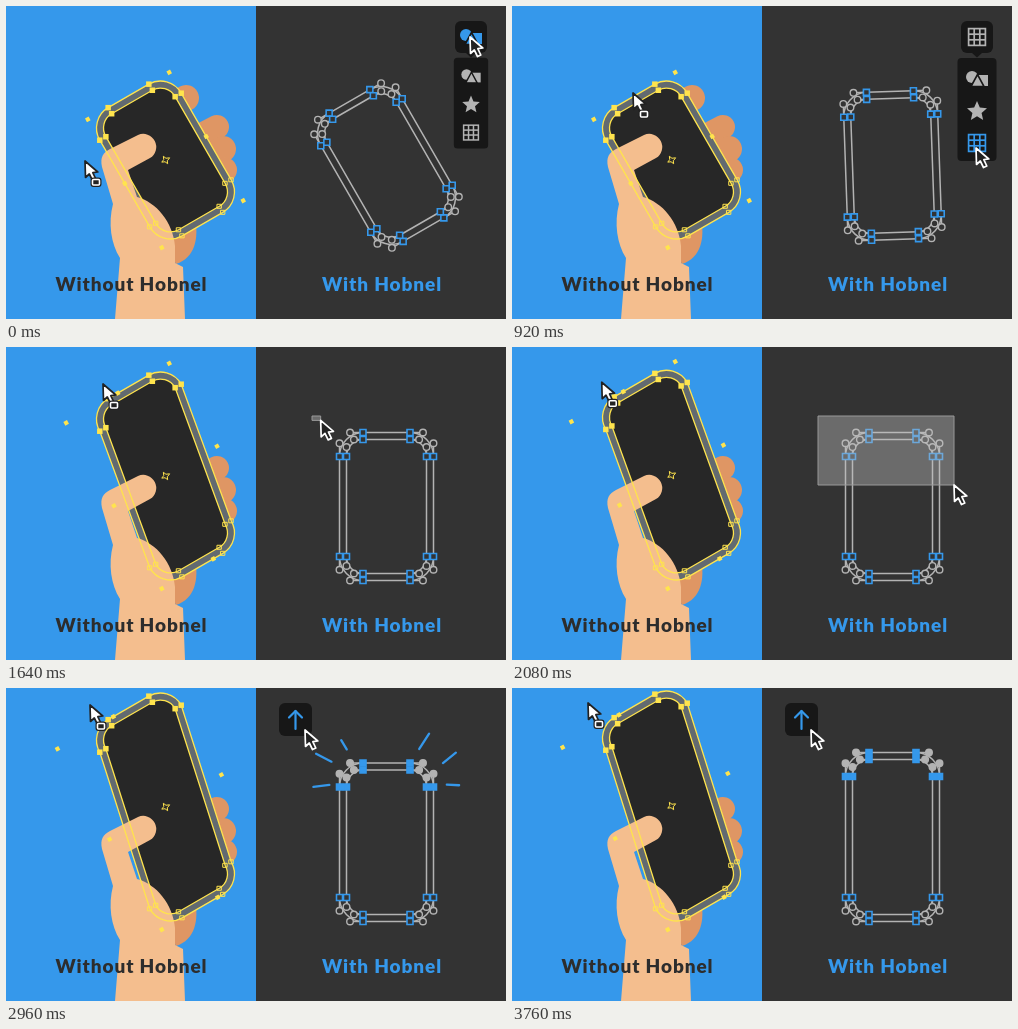
An HTML page with a canvas that plays this animation: 500x313 px, repeating every 3.8 s.

```html
<!DOCTYPE html>
<html lang="en">
<head>
<meta charset="utf-8">
<title>Without and with Hobnel</title>
<style>
  html, body { margin: 0; width: 100%; height: 100%; overflow: hidden; background: #333; }
  canvas { display: block; }
</style>
</head>
<body>
<canvas id="stage" width="500" height="313"></canvas>
<script>
const ctx = document.getElementById('stage').getContext('2d');
const LOOP = 3800, STEP = 40;
const BLUE = '#3598eb', DARK = '#333', BLACK = '#171717', GREY = '#b3b3b3';
const YELLOW = '#ffe44d', SKIN = '#f4be8e', SHADE = '#df9664';

// Pointer tracks: time, x, y
const leftTrack = [
  [0, 79, 155], [120, 80, 153], [840, 121, 87], [920, 121, 87], [1000, 111, 46], [1100, 92, 68],
  [1180, 108, 36], [1300, 75, 62], [1460, 100, 34], [1640, 97, 37], [1840, 45, 45],
  [2040, 98, 34], [2200, 45, 42], [2480, 70, 27], [2640, 43, 42], [2760, 80, 20],
  [2860, 45, 45], [2960, 84, 17], [3160, 13, 46], [3300, 80, 25], [3360, 50, 40],
  [3440, 71, 25], [3580, 36, 46], [3760, 76, 15]
];
const rightTrack = [
  [0, 464, 31], [80, 464, 31], [320, 470, 85], [560, 464, 142], [940, 464, 142],
  [1480, 306, 69], [1560, 306, 69], [2080, 442, 138], [2240, 442, 138],
  [2480, 338, 121], [2760, 299, 42]
];
const grab = [121, 87], marqueeStart = [306, 69];
const clicks = [2840, 3140];
const sparks = [
  [327, 107, 301, 110], [329, 86, 304, 73], [342, 74, 333, 59],
  [411, 75, 427, 50], [434, 88, 455, 71], [438, 107, 458, 108]
];

const ramp = (t, a, b) => Math.min(1, Math.max(0, (t - a) / (b - a)));
const smooth = p => p * p * (3 - 2 * p);

// Monotone Hermite interpolation through the keys
function follow(keys, t) {
  const i = keys.findIndex(k => k[0] > t);
  if (i < 0) return keys[keys.length - 1].slice(1);
  const a = keys[i - 1], b = keys[i], span = b[0] - a[0], p = (t - a[0]) / span;
  const slope = (j, c) => {
    const u = keys[j - 1], v = keys[j], w = keys[j + 1];
    if (!u || !w || (v[c] - u[c]) * (w[c] - v[c]) <= 0) return 0;
    return (w[c] - u[c]) / (w[0] - u[0]);
  };
  return [1, 2].map(c =>
    a[c] + (b[c] - a[c]) * smooth(p) +
    span * p * (1 - p) * (slope(i - 1, c) * (1 - p) - slope(i, c) * p));
}

function paint(path, fill, stroke, width = 1.4) {
  if (fill) { ctx.fillStyle = fill; ctx.fill(path); }
  if (stroke) { ctx.strokeStyle = stroke; ctx.lineWidth = width; ctx.stroke(path); }
}

function box(x, y, w, h, r = 0) {
  const path = new Path2D();
  path.roundRect(x, y, w, h, r);
  return path;
}
const square = (x, y, size) => box(x - size / 2, y - size / 2, size, size);

function disc(x, y, r) {
  const path = new Path2D();
  path.arc(x, y, r, 0, 7);
  return path;
}

function poly(points, closed = true) {
  const path = new Path2D();
  points.forEach(p => path.lineTo(...p));
  if (closed) path.closePath();
  return path;
}

// Rounded frame: maps local points to the stage, top half moved by `shift`
function makePhone(cx, cy, degrees, shift) {
  const cos = Math.cos(degrees * Math.PI / 180), sin = Math.sin(degrees * Math.PI / 180);
  const place = (x, y) => [cx + x * cos - y * sin, cy + x * sin + y * cos];
  const move = (x, y) => {
    const p = place(x, y);
    return y < 0 ? [p[0] + shift[0], p[1] + shift[1]] : p;
  };
  const rings = [[47, 74], [40, 67]].map(([w, h]) => {
    const corner = (sx, sy) => [
      move(sx * 23.5, sy * h),
      move(sx * (23.5 + .552 * (w - 23.5)), sy * h),
      move(sx * w, sy * (50 + .552 * (h - 50))),
      move(sx * w, sy * 50)
    ];
    const corners = [corner(-1, -1).reverse(), corner(1, -1), corner(1, 1).reverse(), corner(-1, 1)];
    const path = new Path2D();
    corners.forEach(([a, b, c, d]) => {
      path.lineTo(...a);
      path.bezierCurveTo(...b, ...c, ...d);
    });
    path.closePath();
    return { path, corners };
  });
  return { rings, place, cos, sin };
}

function drawPointer(x, y, fill, edge, badge) {
  ctx.save();
  ctx.translate(x, y);
  ctx.lineJoin = 'round';
  const arrow = poly([[0, 0], [.5, 16.5], [4.3, 13], [7.5, 19.5], [10.8, 18], [7.8, 11.7], [12.8, 11]]);
  paint(arrow, fill, edge, 1.7);
  if (badge) {
    const tag = box(7.5, 18.5, 7, 5.5, 1);
    paint(tag, null, edge, 4);
    paint(tag, edge, fill, 1.6);
  }
  ctx.restore();
}

function drawLabel(text, x, color) {
  ctx.font = '900 19px Lato, sans-serif';
  ctx.letterSpacing = '.9px';
  ctx.textAlign = 'center';
  ctx.fillStyle = color;
  ctx.fillText(text, x, 285);
}

function drawFingers() {
  ctx.lineCap = 'round';
  [[180, 92, 26], [211, 121, 24], [217, 143, 26], [218.5, 164, 25]].forEach(([x, y, width]) =>
    paint(poly([[x - 25, y + 13], [x, y]], false), null, SHADE, width));
  paint(new Path2D('M150 222L189 212C193 232 189 252 170 258Z'), SHADE);
}

function drawHand() {
  paint(new Path2D(`M109 313L114 252C105 238 102 217 107 198L96 161
    C94 151 97 147 104 143L132 129A13 13 0 0 1 144 152L122 164L131 191
    C150 196 167 216 169 240L169 257L177 261L179 313Z`), SKIN);
}

function drawLeft(t) {
  ctx.save();
  ctx.beginPath();
  ctx.rect(0, 0, 250, 313);
  ctx.clip();
  ctx.fillStyle = BLUE;
  ctx.fillRect(0, 0, 250, 313);

  const pointer = follow(leftTrack, t);
  // The drag snaps to whichever axis dominates
  let shift = [0, 0];
  if (t > 920) {
    const dx = pointer[0] - grab[0], dy = pointer[1] - grab[1];
    shift = Math.abs(dy) > Math.abs(dx) ? [0, dy] : [dx, 0];
  }
  const { rings, place, cos, sin } = makePhone(159.5, 154, -30, shift);

  drawFingers();
  paint(rings[0].path, '#626a70');
  paint(rings[1].path, '#272727');
  drawHand();
  rings.forEach(({ path, corners }) => {
    paint(path, null, YELLOW, 1.3);
    corners.forEach((c, i) => [c[0], c[3]].forEach(p =>
      i < 2 ? paint(square(...p, 5.5), YELLOW) : paint(square(...p, 4), null, YELLOW, 1)));
  });

  // Transform box around all anchors, in the tilted axes
  const lx = shift[0] * cos + shift[1] * sin, ly = shift[1] * cos - shift[0] * sin;
  const x0 = Math.min(-47, -47 + lx), x1 = Math.max(47, 47 + lx), y0 = -74 + ly, y1 = 74;
  const mx = (x0 + x1) / 2, my = (y0 + y1) / 2;
  for (const x of [x0, mx, x1]) for (const y of [y0, my, y1]) {
    if ((x === mx) && (y === my)) continue;
    if ((x === mx) && !shift[0] && !shift[1]) continue;
    const [px, py] = place(x, y);
    paint(poly([[px - 2.8, py - .8], [px + .8, py - 2.8], [px + 2.8, py + .8], [px - .8, py + 2.8]]), YELLOW);
  }
  const [sx, sy] = place(mx, my);
  const star = Array.from({ length: 8 }, (_, i) => {
    const a = (i * 45 + 15) * Math.PI / 180, r = i % 2 ? 4.3 : 1.8;
    return [sx + r * Math.cos(a), sy + r * Math.sin(a)];
  });
  paint(poly(star), null, YELLOW, 1);

  drawLabel('Without Hobnel', 125.5, '#2d2d2d');
  drawPointer(...pointer, '#fff', '#222', true);
  ctx.restore();
}

const icons = {
  shapes(x, y, color) {
    paint(box(x + 1, y - 4, 10, 11), color);
    paint(disc(x - 5, y - 2, 6), color);
    paint(poly([[x - 6, y + 7.5], [x + .5, y - 4.5], [x + 7, y + 7.5]]), color, BLACK, 1.6);
  },
  star(x, y, color) {
    paint(poly(Array.from({ length: 10 }, (_, i) => {
      const a = (i * 36 - 90) * Math.PI / 180, r = i % 2 ? 4.8 : 10.5;
      return [x + r * Math.cos(a), y + .5 + r * Math.sin(a)];
    })), color);
  },
  grid(x, y, color) {
    paint(square(x, y, 18.5), color);
    for (const i of [-1, 0, 1]) for (const j of [-1, 0, 1])
      paint(square(x + i * 5.6, y + j * 5.6, 3.9), BLACK);
  }
};

function drawMenu(t, pointer) {
  const alpha = 1 - ramp(t, 1160, 1440);
  if (!alpha) return;
  const tint = (y, reach) => Math.abs(pointer[1] - y) < reach && pointer[0] > 445 ? BLUE : GREY;
  ctx.save();
  ctx.globalAlpha = alpha;
  ctx.translate(465, 50);
  const scale = .88 + .12 * smooth(ramp(t, 0, 160));
  ctx.scale(scale, scale);
  paint(box(-19.5, 2, 39, 103, 4), BLACK);
  ['shapes', 'star', 'grid'].forEach((name, i) => {
    const y = 23 + 32 * i;
    icons[name](0, y, tint(50 + y, 16));
  });
  ctx.restore();
  ctx.save();
  ctx.globalAlpha = alpha;
  paint(box(449, 15, 32, 32, 6), BLACK);
  paint(poly([[460, 47], [470, 47], [465, 51.5]]), BLACK);
  icons[t < 600 ? 'shapes' : 'grid'](465, 31, tint(31, 17));
  ctx.restore();
}

function drawLiftButton(t, pointer) {
  ctx.save();
  ctx.globalAlpha = ramp(t, 2400, 2560);
  paint(box(273, 15, 33, 33, 6), BLACK);
  ctx.lineCap = ctx.lineJoin = 'round';
  const color = pointer[1] < 48 ? BLUE : GREY;
  paint(poly([[289.5, 41], [289.5, 23]], false), null, color, 2.2);
  paint(poly([[283, 29.5], [289.5, 23], [296, 29.5]], false), null, color, 2.2);
  ctx.restore();
}

function drawSparks(t, lift) {
  clicks.forEach(start => {
    const p = (t - start) / 320;
    if (p < 0 || p > 1) return;
    const head = 1 - (1 - p) ** 3, tail = p * p;
    ctx.lineCap = 'round';
    sparks.forEach(([x, y, ex, ey]) => {
      const at = k => [x + (ex - x) * k, y + (ey - y) * k + lift];
      paint(poly([at(tail), at(head)], false), null, BLUE, 2.3);
    });
  });
}

function drawRight(t) {
  ctx.fillStyle = DARK;
  ctx.fillRect(250, 0, 250, 313);
  const pointer = follow(rightTrack, t);
  const lift = -10.5 * clicks.filter(c => t >= c).length;
  const selected = t >= 2120;
  const angle = -30 * (1 - smooth(ramp(t, 600, 980)));
  const { rings } = makePhone(380.5, 159.5, angle, [0, lift]);

  ctx.lineCap = 'butt';
  rings.forEach(({ path }) => paint(path, null, GREY, 1.5));
  rings.forEach(({ corners }) => corners.forEach((c, i) => {
    const on = selected && i < 2;
    [[c[0], c[1]], [c[3], c[2]]].forEach(([anchor, handle]) => {
      paint(poly([anchor, handle], false), null, GREY, 1.5);
      paint(disc(...handle, 3.3), on ? GREY : DARK, GREY, 1.4);
    });
  }));
  rings.forEach(({ corners }) => corners.forEach((c, i) => [c[0], c[3]].forEach(([x, y]) =>
    paint(square(x, y, 6), selected && i < 2 ? BLUE : DARK, BLUE, 1.6))));

  drawMenu(t, pointer);
  drawLiftButton(t, pointer);
  drawSparks(t, lift);
  if (t > 1560 && !selected) {
    const [x, y] = marqueeStart;
    paint(box(x, y, pointer[0] - x, pointer[1] - y), 'rgba(190,190,190,.4)', '#999', 1);
  }
  drawLabel('With Hobnel', 376, BLUE);
  drawPointer(...pointer, '#222', '#fff');
}

const start = performance.now();
function frame() {
  const t = Math.floor((performance.now() - start) / STEP) * STEP % LOOP;
  drawLeft(t);
  drawRight(t);
  requestAnimationFrame(frame);
}
frame();
</script>
</body>
</html>
```
